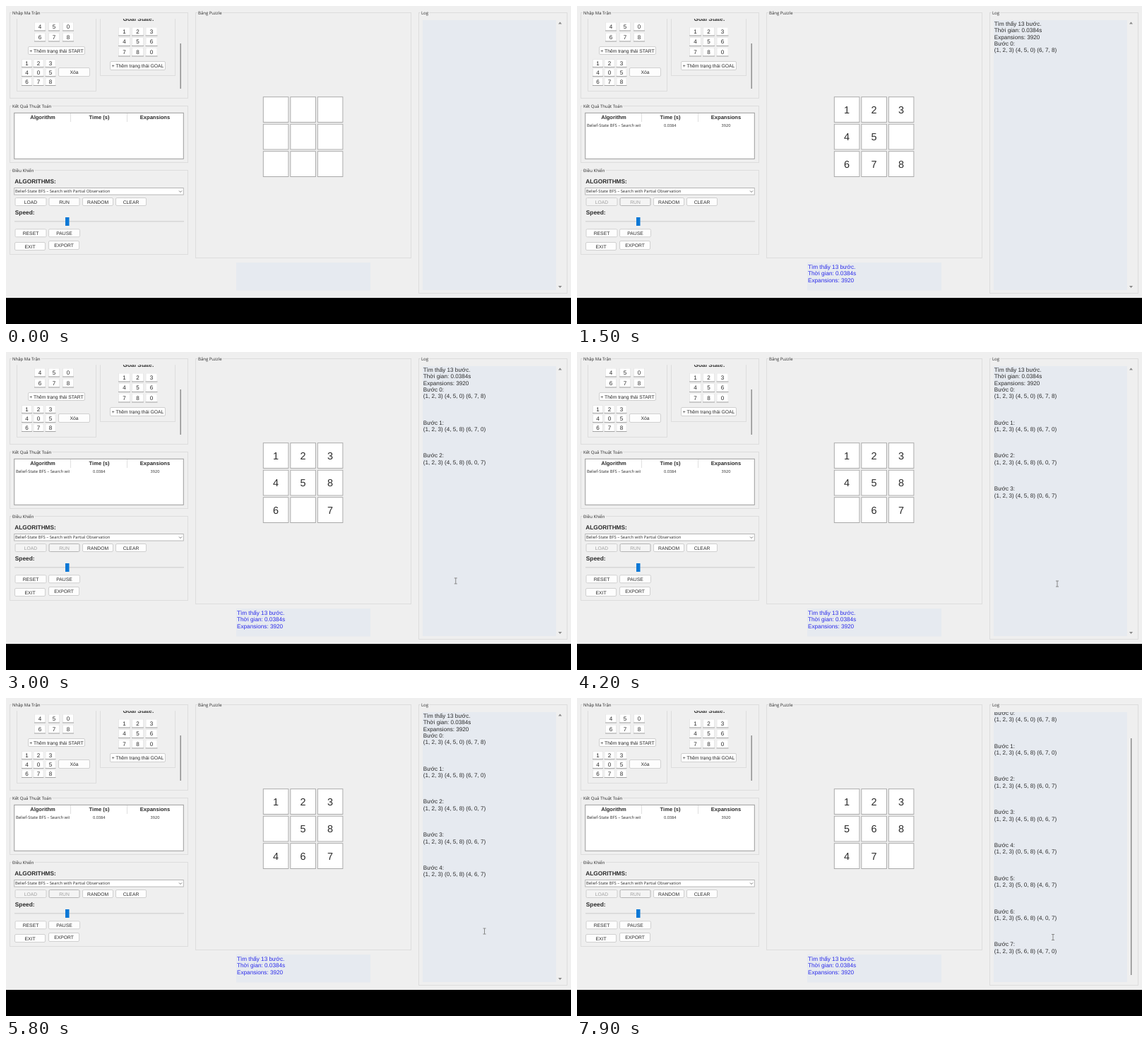
An HTML page with a canvas that plays this animation: 800x450 px, repeating every 8 s.

```html
<!DOCTYPE html>
<html lang="vi">
<head>
<meta charset="utf-8">
<title>Puzzle solver</title>
<style>
html, body { margin: 0; width: 100%; height: 100%; overflow: hidden; background: #efefef; }
canvas { display: block; }
</style>
</head>
<body>
<canvas id="stage" width="800" height="450"></canvas>
<script>
const c = document.getElementById('stage').getContext('2d');
c.textRendering = 'geometricPrecision';
const ARIAL = '"Liberation Sans", Arial, sans-serif';
const UI = '"Open Sans", "Noto Sans", sans-serif';
const BG = '#efefef', PALE = '#e6eaf0', INK = '#2a2a2a';
const LOOP = 8000, SOLVED = 750, FIRST = 890, PERIOD = 1000, LINE = 9.36;
const STATES = ['123450678', '123458670', '123458607', '123458067',
  '123058467', '123508467', '123568407', '123568470'];
const RESULT = ['Tìm thấy 13 bước.', 'Thời gian: 0.0384s', 'Expansions: 3920'];
const ALGO = 'Belief-State BFS – Search with Partial Observation';
// cursor keys: time, x, y
const PATH = [[1900, 211, 304], [2150, 211, 304], [3200, 681, 326], [4200, 680, 328],
  [5800, 677.5, 330], [6900, 676, 334], [7900, 674, 338.5]];

function rect(x, y, w, h, fill, line) {
  c.fillStyle = fill;
  c.fillRect(x, y, w, h);
  if (line) {
    c.strokeStyle = line;
    c.strokeRect(x + .5, y + .5, w - 1, h - 1);
  }
}

function text(s, x, y, size, { font = ARIAL, align = 'left', color = INK, bold = '' } = {}) {
  c.font = `${bold} ${size}px ${font}`;
  c.textAlign = align;
  c.fillStyle = color;
  c.fillText(s, x, y);
}

function poly(points, stroke, fill) {
  c.beginPath();
  points.forEach(([x, y]) => c.lineTo(x, y));
  if (fill) { c.closePath(); c.fillStyle = fill; c.fill(); }
  if (stroke) { c.strokeStyle = stroke; c.stroke(); }
}

function clipped(x, y, w, h, draw) {
  c.save();
  c.beginPath();
  c.rect(x, y, w, h);
  c.clip();
  draw();
  c.restore();
}

function group(label, x, y, w, h) {
  rect(x, y, w, h, BG, '#dddddd');
  c.font = `6px ${UI}`;
  rect(x + 3, y - 2, c.measureText(label).width + 2, 5, BG);
  text(label, x + 4, y + 2.5, 6, { font: UI });
}

function button(label, x, y, w, h, off, focus) {
  c.beginPath();
  c.roundRect(x + .5, y + .5, w - 1, h - 1, 1.5);
  c.fillStyle = off ? '#f4f4f4' : '#fdfdfd';
  c.fill();
  c.strokeStyle = focus ? '#b4b4b4' : '#d0d0d0';
  c.stroke();
  text(label, x + w / 2, y + h / 2 + 2.6, 6.75, { align: 'center', color: off ? '#a0a0a0' : INK });
}

function cells(digits, xs, ys, w, h) {
  [...digits].forEach((d, i) => {
    const x = xs[i % 3], y = ys[i / 3 | 0];
    rect(x - w / 2, y - h / 2, w, h, '#fff', '#e8e8e8');
    rect(x - w / 2, y + h / 2 - 1, w, 1, '#a4a4a4');
    text(d, x, y + 2.8, 8.1, { align: 'center' });
  });
}

function inputs() {
  group('Nhập Ma Trận', 5, 9, 253, 122);
  clipped(10, 18.3, 240, 111, () => {
    rect(15, 0, 113, 121, BG, '#dddddd');
    rect(133, 0, 107, 99, BG, '#dddddd');
    text('Goal State:', 187.5, 20.6, 8.3, { align: 'center', bold: 'bold' });
    cells('450678', [48, 68, 88], [29, 44], 16, 13);
    cells('123456780', [167.5, 186.5, 206], [36, 50.5, 65], 17, 13);
    cells('123405678', [29.5, 46, 63], [81, 94, 107], 15, 12);
    button('+ Thêm trạng thái START', 31, 57, 81, 12);
    button('+ Thêm trạng thái GOAL', 147, 78, 79, 13);
    button('Xóa', 74, 87, 45, 13);
  });
  rect(246.5, 53, 1.4, 64, '#888');
}

function results(solved) {
  group('Kết Quả Thuật Toán', 5, 141, 253, 81);
  rect(11.2, 150.8, 240.6, 66, '#fff', '#999');
  const mid = { align: 'center', bold: 'bold' };
  text('Algorithm', 52, 160.3, 7.55, mid);
  text('Time (s)', 132, 160.3, 7.55, mid);
  text('Expansions', 211, 160.3, 7.55, mid);
  [91, 171].forEach(x => rect(x, 152, 1, 12, '#e0e0e0'));
  if (!solved) return;
  clipped(12, 164, 77.8, 12, () => text(ALGO, 14, 171.3, 5.87, { font: UI }));
  text('0.0384', 131.7, 171.3, 5.6, { font: UI, align: 'center' });
  text('3920', 211, 171.3, 5.6, { font: UI, align: 'center' });
}

function controls(solved) {
  group('Điều Khiển', 5, 232, 253, 120);
  text('ALGORITHMS:', 12.3, 250.9, 8.3, { bold: 'bold' });
  rect(11.2, 257, 240.6, 10.6, '#fff', '#b4b4b4');
  text(ALGO, 13, 264.4, 5.87, { font: UI });
  poly([[245, 261.5], [247, 263.5], [249, 261.5]], '#777');
  button('LOAD', 12.5, 271, 45, 12, solved);
  button('RUN', 60.5, 271, 44, 12, solved, solved);
  button('RANDOM', 108, 271, 44, 12);
  button('CLEAR', 155, 271, 44, 12);
  text('Speed:', 12.8, 295.2, 8.3, { bold: 'bold' });
  rect(12, 304, 240, 1.5, '#d6d6d6');
  rect(84, 299, 5.5, 12, '#0b78d6');
  button('RESET', 12.5, 315.3, 45, 12);
  button('PAUSE', 60, 315.3, 45, 12);
  button('EXIT', 12, 334, 44, 12);
  button('EXPORT', 60, 332, 44, 13);
}

function board(tiles) {
  group('Bảng Puzzle', 268, 9, 306, 348);
  for (let i = 0; i < 9; i++) {
    const x = 363.8 + i % 3 * 38.5, y = 128.2 + (i / 3 | 0) * 38.5;
    rect(x, y, 36.6, 36.8, '#fff', '#a8a8a8');
    if (tiles[i] > 0) text(tiles[i], x + 18.3, y + 23.7, 14.4, { align: 'center' });
  }
}

function log(lines) {
  group('Log', 584, 9, 211, 398);
  rect(590, 20, 189, 382, PALE);
  const full = lines.length > 38;
  clipped(590, 20, 189, 382, () => lines.forEach((s, i) =>
    text(s, 590.8, 27.8 + i * LINE - (full ? 32 : 0), 8.12)));
  if (full) {
    rect(784, 57, 1.4, 335, '#888');
  } else {
    poly([[782, 25.5], [784.5, 22.5], [787, 25.5]], null, '#888');
    poly([[782, 396], [784.5, 399], [787, 396]], null, '#888');
  }
}

function cursor(t) {
  if (t < PATH[0][0]) return;
  const next = PATH.findIndex(p => p[0] > t);
  const k = next < 0 ? PATH.length - 1 : next;
  const [t0, x0, y0] = PATH[k - 1], [t1, x1, y1] = PATH[k];
  const s = Math.min(1, (t - t0) / (t1 - t0));
  const u = s * s * (3 - 2 * s);
  const x = x0 + (x1 - x0) * u, y = y0 + (y1 - y0) * u;
  if (x > 590 && x < 779) {
    poly([[x - 2, y - 4], [x + 2, y - 4]], '#888');
    poly([[x, y - 4], [x, y + 4]], '#888');
    poly([[x - 2, y + 4], [x + 2, y + 4]], '#888');
  } else {
    const arrow = [[0, 0], [0, 8], [1.8, 6.3], [3, 9], [4.2, 8.5], [3, 5.8], [5.5, 5.6], [0, 0]];
    c.lineWidth = .8;
    poly(arrow.map(([a, b]) => [x - 1 + a, y - 5 + b]), '#333', '#fff');
    c.lineWidth = 1;
  }
}

function draw(now) {
  const t = now % LOOP;
  const solved = t >= SOLVED;
  const step = Math.min(7, Math.floor((t - FIRST) / PERIOD));
  const lines = solved ? [...RESULT] : [];
  for (let i = 0; i <= step; i++) {
    const rows = STATES[i].match(/.../g).map(r => `(${[...r].join(', ')})`);
    lines.push(`Bước ${i}:`, rows.join(' '), '', '', '');
  }
  rect(0, 0, 800, 450, BG);
  inputs();
  results(solved);
  controls(solved);
  board(step >= 0 ? STATES[step] : solved ? '123450670' : '000000000');
  rect(326, 363, 190, 39.5, PALE);
  if (solved) RESULT.forEach((s, i) => text(s, 327, 371.8 + i * LINE, 8.2, { color: '#2b2bea' }));
  log(lines);
  rect(0, 413, 800, 37, '#000');
  cursor(t);
}

const start = performance.now();
function tick() {
  draw(performance.now() - start);
  requestAnimationFrame(tick);
}
tick();
</script>
</body>
</html>
```
